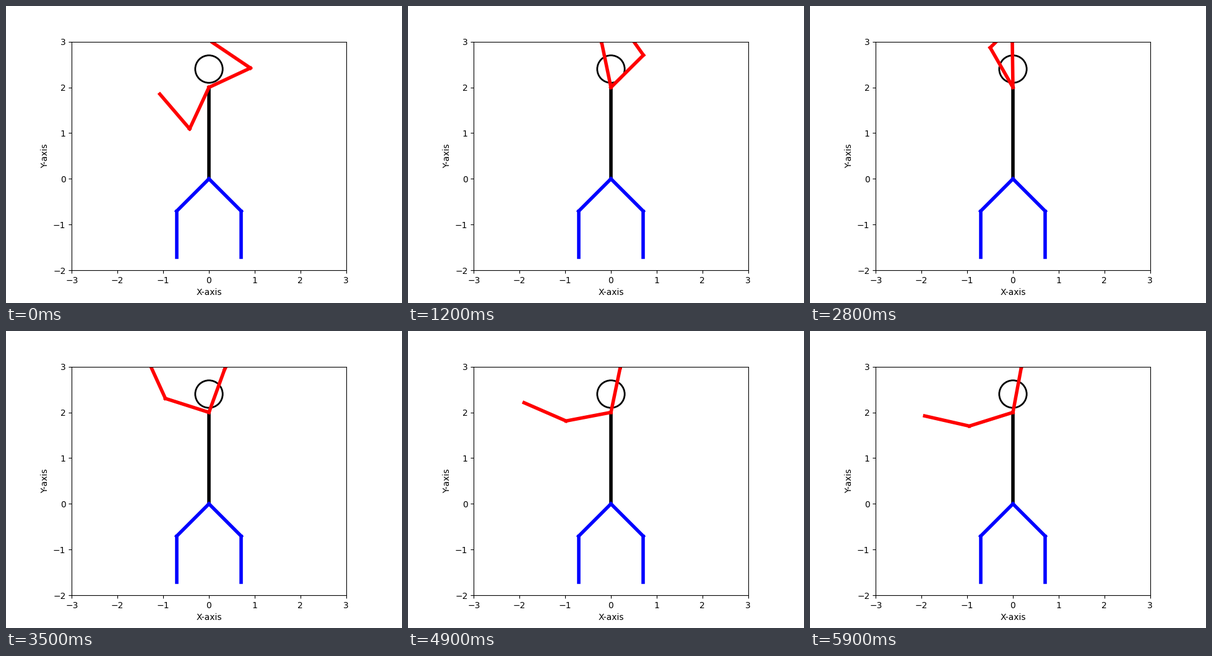
Write a matplotlib script that moves like this. It is 640x480 px and loops after 6000 ms.

```python
import numpy as np
import matplotlib.pyplot as plt
from matplotlib.animation import FuncAnimation

FRAMES = 60
SHOULDER = np.array([0.0, 2.0])
HIP = np.array([0.0, 0.0])

# Key poses: left upper arm, left forearm, right upper arm, right forearm
# (degrees from the x axis), each reached at the step of the same index
STEPS = [0, 7, 12, 20, 28, 41, 49, 59]
POSES = np.array([
    (245, 130.6, 25, 146),
    (122, 60, 5, 10),
    (101.7, 75, 44.8, 125.3),
    (105.4, 40, 80.6, 95),
    (119.8, 45, 90.8, 95),
    (173.8, 148.2, 83.3, 95),
    (190.8, 156.5, 78.3, 95),
    (197.4, 167.2, 79.5, 95),
])
SWAY = np.array([24, 25, -30, -60])

fig, ax = plt.subplots(figsize=(6.4, 4.8), dpi=100)
ax.set_xlim(-3, 3)
ax.set_ylim(-2, 3)
ax.set_aspect("equal")
ax.set_xlabel("X-axis")
ax.set_ylabel("Y-axis")


def step_from(point, angle):
    a = np.radians(angle)
    return point + np.array([np.cos(a), np.sin(a)])


def limb(color):
    return [ax.plot([], [], color=color, lw=4)[0] for _ in range(2)]


def place(lines, start, angles):
    """Place unit-length segments end to end."""
    for line, angle in zip(lines, angles):
        end = step_from(start, angle)
        line.set_data([start[0], end[0]], [start[1], end[1]])
        start = end


def arm_angles(i):
    """Blend between poses, with a fading sway that is zero at each pose."""
    index = np.arange(len(STEPS))
    p = np.interp(i, STEPS, index)
    base = np.array([np.interp(p, index, track) for track in POSES.T])
    return base + SWAY * np.exp(-p / 8) * np.sin(np.pi * p) ** 2


ax.add_patch(plt.Circle((0, 2.4), 0.3, fill=False, color="black", lw=2))
ax.plot([0, 0], [0, 2], color="black", lw=4)
left_arm, right_arm = limb("red"), limb("red")
for thigh in (225, 315):
    place(limb("blue"), HIP, (thigh, 270))


def update(i):
    angles = arm_angles(i)
    place(left_arm, SHOULDER, angles[:2])
    place(right_arm, SHOULDER, angles[2:])
    return left_arm + right_arm


anim = FuncAnimation(fig, update, frames=FRAMES, interval=100, repeat=True)
plt.show()
```
